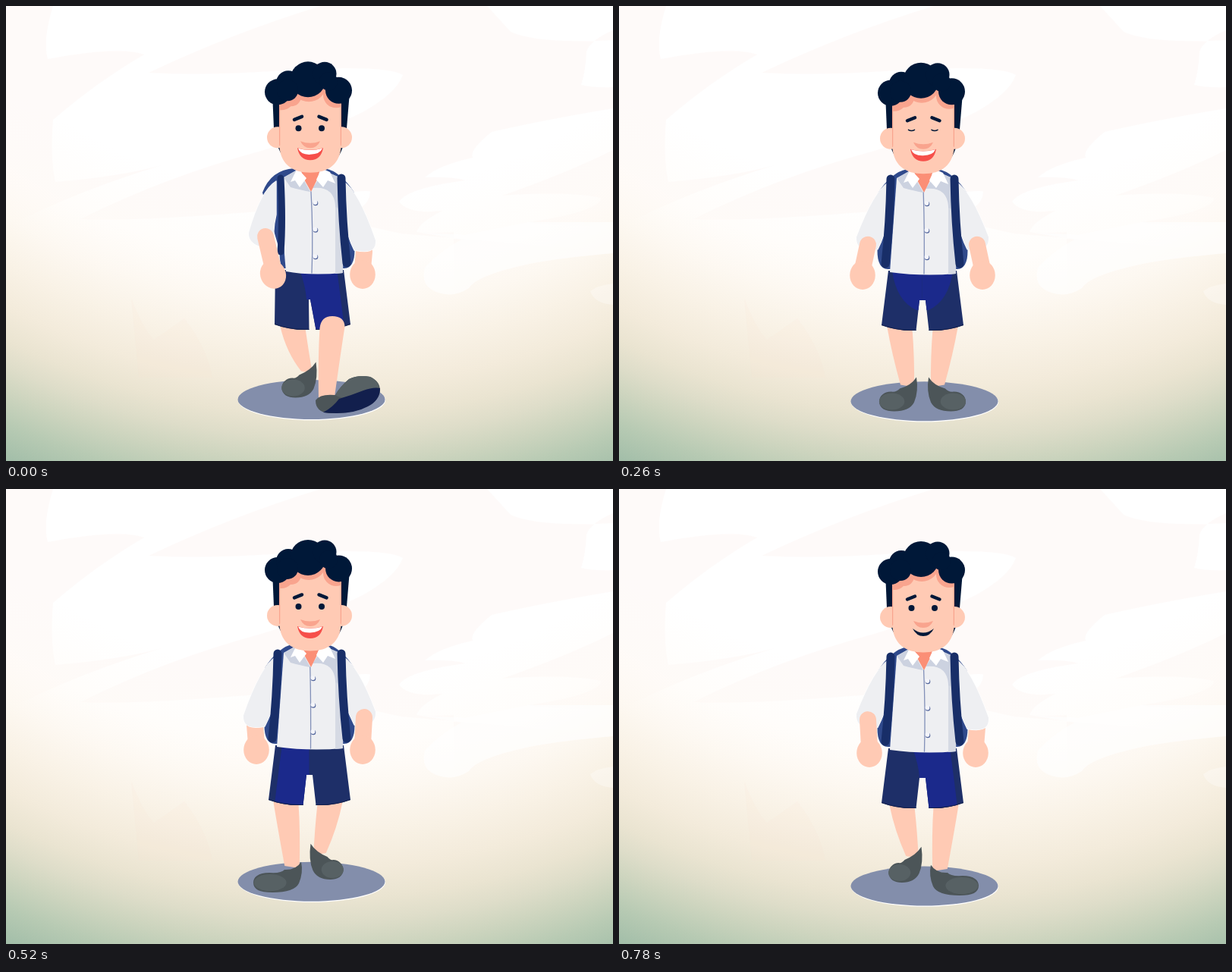
Write an HTML page with a canvas that moves like this. It is 800 px wide and 600 px high and loops after 0.91 s.

```html
<!DOCTYPE html>
<html lang="en">
<head>
<meta charset="utf-8">
<title>Walking schoolboy</title>
<style>
  html, body { margin: 0; width: 100%; height: 100%; overflow: hidden; }
  canvas { display: block; }
</style>
</head>
<body>
<canvas id="stage" width="800" height="600"></canvas>
<script>
const ctx = document.getElementById('stage').getContext('2d');
const HOLD = 130;

const HAIR = '#001838', SKIN = '#ffcab4', BLUSH = '#f9a48e', SHIRT = '#eeeff2',
  FOLD = '#ccd2e0', STRAP = '#182e68', PACK = '#304a8c', BRIGHT = '#1b298b',
  DARK = '#1e2f68', HEM = '#14224f', SHOE = '#4c5558', TOE = '#576164';

// Stride: 1 = right leg fully forward, -1 = left leg. Lift: height of the body.
const strides = [1, .5, 0, -1, -.5, 0, .5];
const lifts = [0, 0, 1, -4, -10, -7, -6];
const COUNT = strides.length;

const clampUp = v => Math.max(0, v);
const extreme = v => clampUp(v - .5) * 2;

function fill(d, color) {
  ctx.fillStyle = color;
  ctx.fill(new Path2D(d));
}

function line(d, color, width) {
  ctx.strokeStyle = color;
  ctx.lineWidth = width;
  ctx.lineCap = ctx.lineJoin = 'round';
  ctx.stroke(new Path2D(d));
}

function oval(x, y, rx, ry, color, turn = 0) {
  ctx.fillStyle = color;
  ctx.beginPath();
  ctx.ellipse(x, y, rx, ry, turn, 0, Math.PI * 2);
  ctx.fill();
}

const dot = (x, y, r, color) => oval(x, y, r, r, color);

function shifted(x, y, draw) {
  ctx.save();
  ctx.translate(x, y);
  draw();
  ctx.restore();
}

function clipped(d, draw) {
  ctx.save();
  ctx.clip(new Path2D(d));
  draw();
  ctx.restore();
}

// Limbs are described for the right half and mirrored for the left one.
function bothSides(draw) {
  for (const side of [-1, 1]) {
    ctx.save();
    if (side < 0) ctx.transform(-1, 0, 0, 1, 800, 0);
    draw(side);
    ctx.restore();
  }
}

function backdrop() {
  ctx.fillStyle = '#fefaf9';
  ctx.fillRect(0, 0, 800, 600);
  fill('M62 0H415Q300 35 188 88Q260 92 350 86Q500 76 523 91Q515 115 470 140Q420 165 340 190' +
    'Q210 225 98 281Q160 285 345 270V400H0V292Q90 245 205 210Q150 225 65 232Q58 200 62 150' +
    'Q120 100 182 64Q150 52 55 70Q48 45 62 0Z', '#fff');
  fill('M634 0H800V32Q770 45 765 60Q764 85 758 104Q775 108 800 107V45Q700 50 665 34Z', '#fff');
  fill('M800 135Q710 150 640 166Q610 190 615 200Q570 210 552 226Q590 225 605 230' +
    'Q530 240 518 258Q530 275 575 270Q545 285 541 298Q570 300 590 298V420H340V260' +
    'Q480 240 480 245Q480 270 430 280L520 300L800 324V290Q700 290 690 285Q785 270 784 253' +
    'Q740 244 654 250Q740 220 800 190Z', '#fff');
  const glow = ctx.createRadialGradient(420, -400, 0, 420, -400, 1090);
  const stops = [[650, '255,251,246,0'], [740, '255,251,246,.5'], [800, '253,248,241,1'],
    [850, '249,242,230,1'], [900, '243,235,219,1'], [940, '234,228,209,1'],
    [970, '222,221,201,1'], [1000, '206,213,191,1'], [1040, '183,202,179,1'], [1090, '159,188,167,1']];
  for (const [r, rgba] of stops) glow.addColorStop(r / 1090, `rgba(${rgba})`);
  ctx.fillStyle = glow;
  ctx.fillRect(0, 0, 800, 600);
  fill('M541 298Q570 300 605 302L690 285H800V326Q730 332 690 340Q620 355 610 372' +
    'Q590 385 570 378Q545 370 552 345Q570 325 600 308Z', 'rgba(255,255,255,.65)');
  fill('M770 376Q780 368 800 366V394Q775 392 770 376Z', 'rgba(255,255,255,.3)');
  fill('M165 385Q180 425 195 440L235 412Q265 450 272 490H175Z', 'rgba(240,222,200,.12)');
}

function shadow({ stride, lean }) {
  const x = 402.5 + lean;
  const y = 521.2 + 2.9 * Math.sin(Math.PI * stride) - 2.3 * stride ** 2;
  oval(x + .5, y + 1, 97, 26.3, '#fff');
  oval(x, y, 97, 26, '#838eab');
}

// The ankle follows a parabola as the leg swings from back (-1) to front (1).
function joints(a, lift) {
  return {
    kneeX: 430 + 4 * a - 4 * a * a,
    kneeY: 421 + lift,
    ankleX: 420 + 9.5 * a - 7 * a * a,
    ankleY: 498.5 + 17 * a + lift
  };
}

function leg(a, lift) {
  const { kneeX, kneeY, ankleX, ankleY } = joints(a, lift);
  const top = kneeY - 12, slant = (ankleX - kneeX) * .25, w = 9 + 1.5 * a;
  fill(`M${kneeX - 16.5} ${kneeY + 4}Q${kneeX - 15} ${top} ${kneeX} ${top}` +
    `Q${kneeX + 16} ${top} ${kneeX + 16.5} ${kneeY + 2}` +
    `Q${kneeX + 13 + slant} ${kneeY + 36} ${ankleX + w} ${ankleY}L${ankleX - w} ${ankleY + 3}` +
    `Q${kneeX - 17 + slant} ${kneeY + 40} ${kneeX - 16.5} ${kneeY + 4}Z`, SKIN);
}

function flatShoe(a, lift) {
  const { ankleX, ankleY } = joints(a, lift);
  const heel = ankleX - 12, top = ankleY - 10 + 7 * a + 5 * a * a;
  const toe = ankleX + 37 + 20 * a + 16 * a * a, mid = toe - (toe - heel) * .4;
  const y = ankleY + 22, r = 13;
  fill(`M${heel} ${top}Q${heel + 7} ${top + 11} ${ankleX + 10} ${ankleY + 5}` +
    `Q${ankleX + 14} ${y - r + 1} ${mid + 4} ${y - r}C${toe - 6} ${y - r} ${toe} ${y - 7} ${toe} ${y}` +
    `C${toe} ${y + 9} ${toe - 8} ${y + r} ${mid} ${y + r}` +
    `Q${heel + 9} ${y + r} ${heel + 3} ${y + 1}Q${heel - 3} ${y - r} ${heel} ${top}Z`, SHOE);
  oval(mid + 3, y, (toe - heel) * .34, r * .85, TOE);
}

function raisedShoe(lift) {
  shifted(0, lift / 2, () => {
    fill('M408 520Q414 511 434 513Q440 502 452 492Q464 486 480 489Q493 495 493 507' +
      'Q492 520 476 528Q455 538 425 537Q408 535 408 520Z', SHOE);
    fill('M434 513Q440 502 452 492Q464 486 480 489Q490 494 492 503Q473 505 457 514Q445 520 434 513Z', TOE);
    fill('M418 536Q431 529 439 518Q456 513 471 507Q484 502 493 504Q493 520 477 528Q455 540 418 536Z', '#121f4d');
  });
}

function legs({ stride, lift }, inFront) {
  bothSides(side => {
    const a = stride * side;
    if (a > .5 === inFront) leg(a, lift);
  });
}

function shoes({ stride, lift }) {
  bothSides(side => {
    const a = stride * side;
    if (a > .5) raisedShoe(lift);
    else flatShoe(a, lift);
  });
}

function trousers({ stride, lift }) {
  const gap = 4 - 3 * extreme(Math.abs(stride));
  shifted(0, lift, () => bothSides(side => {
    const a = stride * side, inward = 8 * extreme(-a);
    const inner = 408.5 - inward, outer = 454 - inward;
    const hem = `${outer} 420Q${inner + 24} 428 ${inner} 427`;
    const shape = `M399.5 348H445L${hem}L${400 + gap} 387H399.5Z`;
    fill(shape, DARK);
    clipped(shape, () => {
      if (a > 0) fill('M390 340H435Q442 390 447 435H390Z', BRIGHT);
      if (a === 0) fill('M390 340H441Q437 387 408 400H390Z', BRIGHT);
      line(`M${hem}`, HEM, 2);
    });
    if (a > 0) fill('M400 348H387Q395 370 396 387H400Z', BRIGHT);
  }));
}

function pack({ stride }) {
  bothSides(side => {
    const reach = extreme(-stride * side), low = 459.5 - 20 * reach;
    fill(`M399 215L420 214Q${441 + 10 * reach} ${218 - 2 * reach} ${459 + 3 * reach} 246` +
      `L${low} 322Q${low} 345 ${446 - 12 * reach} 346H399Z`, PACK);
  });
}

function arm(c, lift) {
  const reach = extreme(c);
  return {
    inFront: c >= 0,
    tilt: reach * .4,
    cuffX: 487 - 7 * reach, cuffY: 304 - 5 * c + lift * .8,
    innerX: 459 - 14 * reach, innerY: 320 - 2 * c + lift * .8,
    elbowX: 472 - 14 * reach, elbowY: 314 - 10 * c + lift * .8,
    handX: 479 - 18 * Math.min(.5, Math.abs(c)) - 22 * reach, handY: 354 + lift
  };
}

function sleeve({ cuffX, cuffY, innerX, innerY }, lift) {
  const top = 231 + lift;
  const shape = `M444 ${top}Q464 ${top + 12} ${cuffX} ${cuffY}` +
    `C${cuffX + 1} ${cuffY + 16} ${innerX + 16} ${innerY + 3} ${innerX} ${innerY}` +
    `Q450 ${innerY - 18} 444 275Z`;
  line(shape, '#fff', 1.4);
  fill(shape, SHIRT);
}

function forearm({ elbowX, elbowY, handX, handY, tilt }) {
  line(`M${elbowX} ${elbowY}L${handX} ${handY - 8}`, SKIN, 22);
  oval(handX, handY, 16.8, 19, SKIN, tilt);
}

function arms({ stride, lift }, inFront) {
  bothSides(side => {
    const limb = arm(-stride * side, lift);
    if (limb.inFront === inFront) forearm(limb);
  });
}

function sleeves({ stride, lift }) {
  bothSides(side => sleeve(arm(-stride * side, lift), lift));
}

function torso({ stride }) {
  const left = 357 + 12 * extreme(stride);
  const shape = `M382 217L366 226Q362 280 ${left} 350Q400 356 444 352Q445 280 437 225L419 217Z`;
  fill(shape, SHIRT);
  clipped(shape, () => {
    fill('M404 240Q432 237 434 263V355H448V222L420 217Z', FOLD);
    fill('M434 265V355H446V270Z', '#d6dae4');
    fill('M382 217L366 226L375 239Q390 243 401 245L390 225Z', FOLD);
  });

  fill('M387 211H415L411 227L402 245L392 227Z', '#fb8f76');
  fill('M384 214L375 232L381 230L387 239L396 227Z', '#fff');
  fill('M416 214L409 229L418 239L424 230L434 234L427 219Z', '#fff');

  const x = 2 * stride - 2;
  line(`M${402 + x * .4} 245Q${405 + x} 300 ${403 + x * .5} 352`, '#8290b8', 1.3);
  for (let i = 0; i < 3; i++) {
    const y = 260 + i * 35.5;
    dot(408 + x, y, 3.3, '#53669c');
    dot(407.5 + x, y - 1, 2.9, '#f4f5fa');
  }

  bothSides(side => {
    const reach = extreme(-stride * side);
    line(`M${442 - 4 * reach} 227Q${443 - 8 * reach} 285 ${449 - 11 * reach} ${339 - 15 * reach}`,
      STRAP, 11 - 2 * reach);
  });
}

function head({ headY, blink, grin }) {
  shifted(0, headY, () => {
    fill('M351 112L353 160Q357 192 370 202H434Q445 192 449 160L453 112Z', HAIR);
    bothSides(() => dot(442, 172, 14, SKIN));
    const face = 'M360 108V178C360 208 378 218.5 401 218.5S442 208 442 178V108Z';
    fill(face, SKIN);
    clipped(face, () => {
      for (const [x, y, r] of [[363, 119, 17], [376, 118, 13], [399, 102, 23], [435, 116, 17]])
        dot(x, y, r, BLUSH);
      line('M360 125V182M442 125V182', BLUSH, 2.5);
    });

    const curls = [[358, 112, 17], [372, 100, 16], [398, 95.5, 23.5], [420, 88, 15.5],
      [438.5, 110, 17.5], [425, 98, 12], [371, 110, 14]];
    for (const [x, y, r] of curls) dot(x, y, r, HAIR);

    line('M380 148.5L390 144.5M412.5 144.5L422.5 148.5', HAIR, 4.5);
    for (const x of [385.5, 416]) {
      if (blink) line(`M${x - 4} 160.5q4 2.5 8 0`, HAIR, 1.5);
      else dot(x, 160, 4, HAIR);
    }
    fill('M388 177Q401 182 414 177Q410 186 401 186T388 177Z', BLUSH);
    if (grin) {
      fill('M384 186Q401 191 418 186Q415 202 401 202T384 186Z', '#f64f4a');
      fill('M385 186.5Q401 191 417 186.5Q414 194 401 194.5T385 186.5Z', '#fff');
    } else {
      fill('M387 187Q401 198 415 187Q410 197 401 197T387 187Z', HAIR);
    }
  });
}

function drawPose(i) {
  const stride = strides[i], lift = lifts[i];
  const pose = {
    stride, lift,
    lean: -4 * extreme(-stride),
    headY: 5 * Math.cos(2 * Math.PI * (i - 1.2) / COUNT) - 1,
    blink: i === 2,
    grin: i < 5
  };
  backdrop();
  shadow(pose);
  shifted(pose.lean, lift, () => pack(pose));
  legs(pose, false);
  trousers(pose);
  legs(pose, true);
  shoes(pose);
  arms(pose, false);
  sleeves(pose);
  shifted(pose.lean, lift, () => torso(pose));
  arms(pose, true);
  head(pose);
}

let shown = -1;
const start = performance.now();
function tick() {
  const index = Math.floor((performance.now() - start) / HOLD) % COUNT;
  if (index !== shown) drawPose(shown = index);
  requestAnimationFrame(tick);
}
tick();
</script>
</body>
</html>
```
